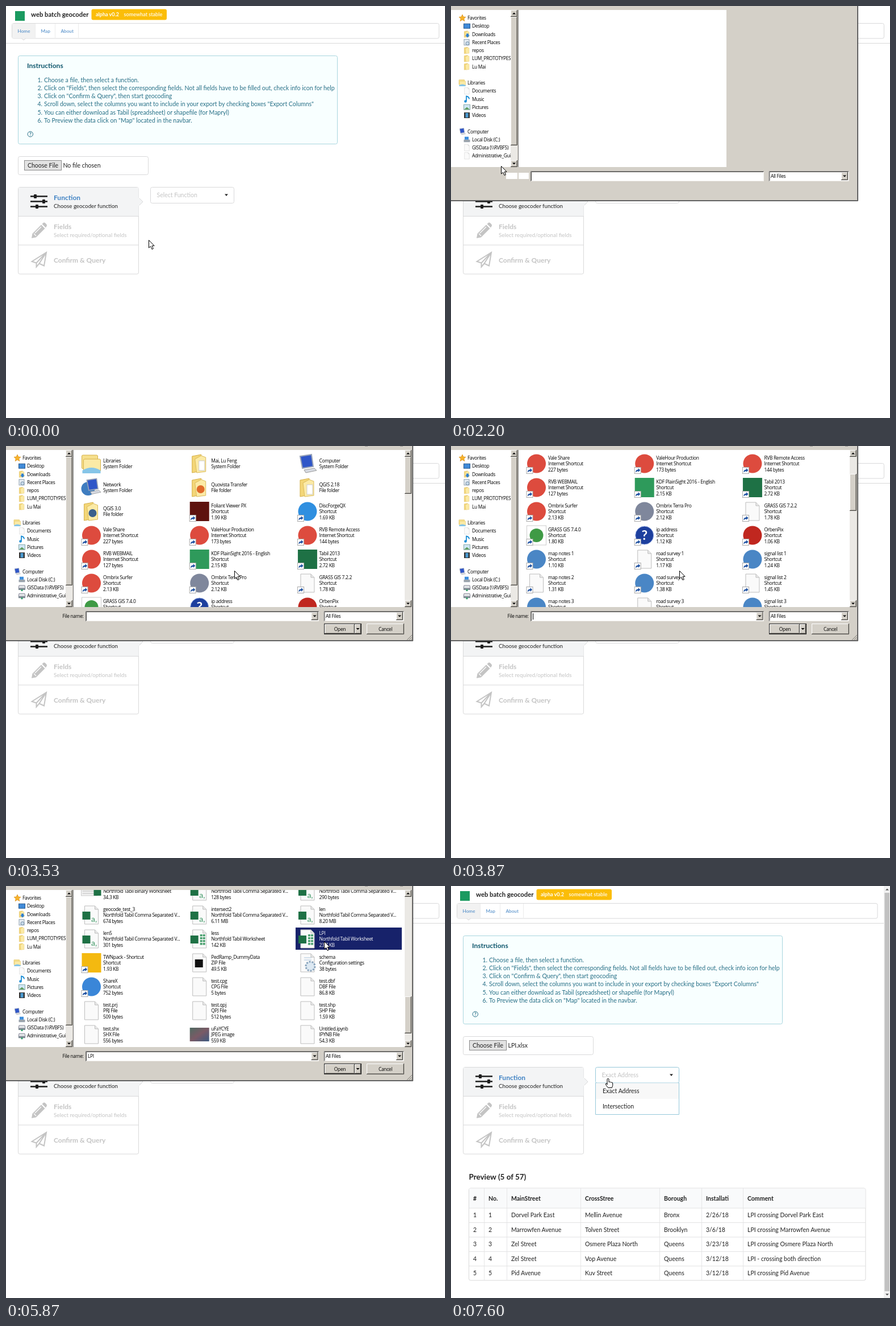
Write an HTML page that moves like this. It is 773 by 724 pixels and loops after 8 s.

```html
<!DOCTYPE html>
<html lang="en">
<head>
<meta charset="utf-8">
<title>Batch geocoder</title>
<style>
html, body { margin: 0; width: 100%; height: 100%; overflow: hidden; background: #fff; }
svg { display: block; width: 100vw; height: 100vh; }
text { font: 10.5px Lato, sans-serif; fill: #212121; white-space: pre; }
.b { font-weight: 700; }
.h2 { font-size: 13.44px; font-weight: 700; }
.h4 { font-size: 11.25px; font-weight: 700; }
.t { font-size: 12px; font-weight: 700; }
.d { font-size: 9.75px; }
.m { font-size: 8.25px; }
.l { font-size: 9px; font-weight: 700; fill: #fff; }
.w { font: 8.4px "Open Sans", "Noto Sans", sans-serif; letter-spacing: -.3px; fill: #000; }
.comma { font-size: 14px; fill: #3d9865; }
.ask { font-size: 23px; font-weight: 700; fill: #fff; }
.link { fill: #4183c4; }
.info { fill: #276f86; }
.dark { fill: #0e566c; }
.off { fill: #c4c4c4; }
.mid { text-anchor: middle; }
.end { text-anchor: end; }
.picked .w { fill: #fff; }
</style>
</head>
<body>
<svg id="stage" viewBox="0 0 773 724"></svg>
<script>
const LOOP = 8000, ROW = 42;
const LINE = '#d9d9da', FACE = '#d4d0c8';

const text = (x, y, s, c = '') => `<text x="${x}" y="${y}" class="${c}">${s}</text>`;
const rect = (x, y, w, h, fill, stroke = 'none', r = 0) =>
  `<rect x="${x}" y="${y}" width="${w}" height="${h}" rx="${r}" fill="${fill}" stroke="${stroke}"/>`;
const path = (d, fill, stroke = 'none', sw = 1) =>
  `<path d="${d}" fill="${fill}" stroke="${stroke}" stroke-width="${sw}"/>`;
const circle = (x, y, r, fill, stroke = 'none') =>
  `<circle cx="${x}" cy="${y}" r="${r}" fill="${fill}" stroke="${stroke}"/>`;
const group = (id, s, attr = '') => `<g id="${id}" ${attr}>${s}</g>`;
const at = (x, y, s, k = 1) => `<g transform="translate(${x} ${y}) scale(${k})">${s}</g>`;

// ---------- web page ----------
const steps = [
  'Choose a file, then select a function.',
  'Click on "Fields", then select the corresponding fields. Not all fields have to be filled out, check info icon for help',
  'Click on "Confirm &amp; Query", then start geocoding',
  'Scroll down, select the columns you want to include in your export by checking boxes "Export Columns"',
  'You can either download as Tabil (spreadsheet) or shapefile (for Mapryl)',
  'To Preview the data click on "Map" located in the navbar.'
];

const header =
  rect(16, 9, 17, 17, '#1b9a60') +
  text(44, 19, 'web batch geocoder', 'h4') +
  rect(150.5, 5.5, 132.5, 19, '#fbbd08', 'none', 3) +
  text(158, 18.2, 'alpha v0.2', 'l') +
  `<g opacity=".85">${text(207.5, 18.2, 'somewhat stable', 'l')}</g>` +
  '<rect id="bar" x="10.5" y="30.5" width="752" height="26.5" rx="3" fill="#fff" stroke="#d9d9da"/>' +
  rect(11, 31, 40, 25.5, '#f2f2f2') +
  path('M51.5 31V57M86.5 31V57M127.5 31V57', 'none', '#ececec') +
  path('M27.5 57L31 60L34.5 57', '#f2f2f2', LINE) +
  text(20.5, 46.5, 'Home', 'm link') + text(61.5, 46.5, 'Map', 'm link') + text(96.5, 46.5, 'About', 'm link') +
  path('M0 65.5H773', 'none', '#d8d8d8');

const help =
  rect(21.5, 87.5, 562, 155, '#f8ffff', '#a9d5de', 3) +
  text(37, 109, 'Instructions', 't dark') +
  steps.map((s, i) => text(64, 133.5 + i * 14.25, i + 1 + '.', 'info end') + text(67, 133.5 + i * 14.25, s, 'info')).join('') +
  circle(42.8, 225.2, 4.7, 'none', '#276f86') + text(42.8, 228.4, '?', 'm b info mid');

const sliders = path('M43 334.5H73M43 343.5H73M43 352.5H73', 'none', '#1f1f1f', 2.4) +
  [[49, 331], [64, 340], [52, 349]].map(([x, y]) => rect(x, y, 5, 7, '#1f1f1f', 'none', 1)).join('');
const pencil = path('M45 408L46.5 400L62 384.5L68.5 391L53 406.5ZM63.5 383L66 380.8Q67.5 380 69 381.2L71.6 384Q72.6 385.6 71.5 387L70 389.5Z', '#c4c4c4') +
  path('M49 400L53 404M51 399L62 388', 'none', '#fff', 1.3);
const plane = path('M45.5 449L71 433L67 456.5L58.5 452.5L53.5 458.5V451.5ZM53.5 451.5L71 433L58.5 452.5', 'none', '#c4c4c4', 2);

const wizard =
  rect(21.5, 264.5, 229, 32, '#fff', LINE, 3) +
  '<rect id="choose" x="32.5" y="271.5" width="65" height="17" fill="#e3e3e3" stroke="#8a8a8a"/>' +
  text(38, 284, 'Choose File') + '<text id="chosen" x="100.5" y="284"></text>' +
  path('M233 336L241 344L233 352', '#f3f4f5', LINE) +
  rect(21.5, 318.5, 212, 152.5, '#fff', LINE, 3) +
  rect(22, 319, 211.5, 50, '#f3f4f5') + rect(231, 337, 4, 14, '#f3f4f5') +
  path('M22 369.5H233M22 420H233', 'none', LINE) +
  sliders + pencil + plane +
  text(84, 341, 'Function', 't link') + text(84, 354.5, 'Choose geocoder function', 'd') +
  text(84, 392, 'Fields', 't off') + text(84, 405.5, 'Select required/optional fields', 'd off') +
  text(84, 450.5, 'Confirm &amp; Query', 't off');

const dropdown =
  '<rect id="box" x="254.5" y="318.5" width="147" height="28" rx="3" fill="#fff"/>' +
  '<text id="value" x="265.5" y="336" class="off"></text>' +
  path('M385 330.5H391L388 334Z', '#222') +
  group('menu', path('M254.5 0H401.5V55.5H254.5Z', '#fff', '#96c8da') +
    rect(255, 0.5, 146, 27.5, '#f8f8f8') +
    text(267, 17.5, 'Exact Address') + text(267, 45, 'Intersection'));

const cols = [39, 66, 106, 236, 375, 449, 522];
const table = `#|No.|MainStreet|CrossStree|Borough|Installati|Comment
1|1|Dorvel Park East|Mellin Avenue|Bronx|2/26/18|LPI crossing Dorvel Park East
2|2|Marrowfen Avenue|Tolven Street|Brooklyn|3/6/18|LPI crossing Marrowfen Avenue
3|3|Zel Street|Osmere Plaza North|Queens|3/23/18|LPI crossing Osmere Plaza North
4|4|Zel Street|Vop Avenue|Queens|3/12/18|LPI - crossing both direction
5|5|Pid Avenue|Kuv Street|Queens|3/12/18|LPI crossing Pid Avenue`.split('\n').map(r => r.split('|'));
const preview =
  text(31.5, 516, 'Preview (5 of 57)', 'h2') +
  rect(31.5, 531, 698.5, 162, '#fff', LINE, 3) + rect(32, 531.5, 697.5, 34.5, '#f9fafb') +
  cols.slice(1).map(x => path(`M${x - 7.5} 531V693`, 'none', '#e6e6e7')).join('') +
  table.map((r, i) => {
    const y = i ? 557 + i * 25.45 : 552.7;
    return r.map((s, j) => text(cols[j], y, s, i ? '' : 'b')).join('') +
      (i ? path(`M32 ${540.6 + i * 25.45}H730`, 'none', '#e2e2e3') : '');
  }).join('') +
  rect(762, 0, 11, 724, '#f1f1f1') + rect(763.5, 12, 8.5, 700, '#c1c1c1') +
  path('M765 7.5H771L768 4.5ZM765 716.5H771L768 719.5Z', '#505050');

// ---------- file dialog ----------
const corner = (x, y, w, h, c) => path(`M${x} ${y + h - .5}H${x + w - .5}V${y}`, 'none', c);
const edge = (x, y, w, h, c) => path(`M${x + .5} ${y + h}V${y + .5}H${x + w}`, 'none', c);
const bevel = (x, y, w, h) => rect(x, y, w, h, FACE) + edge(x, y, w, h, '#fff') +
  corner(x + 1, y + 1, w - 2, h - 2, '#a5a29b') + corner(x, y, w, h, '#45433f');
const well = (x, y, w, h) => rect(x, y, w, h, '#fff') + corner(x, y, w, h, '#f2f0ec') +
  edge(x, y, w, h, '#808080') + edge(x + 1, y + 1, w - 2, h - 2, '#55534f');
const down = (x, y) => path(`M${x - 3} ${y - 1.5}H${x + 3}L${x} ${y + 1.5}Z`, '#000');
const up = (x, y) => path(`M${x - 3} ${y + 1.5}H${x + 3}L${x} ${y - 1.5}Z`, '#000');
const scroller = (x, id, h) => rect(x, 7, 12, 276, '#ebe9e5') +
  bevel(x, 7, 12, 12) + up(x + 6, 13) + bevel(x, 271, 12, 12) + down(x + 6, 277) +
  group(id, bevel(x, 19, 12, h));

const page = path('M-12 -16H6L12 -10V16H-12Z', '#fafafa', '#bdbdbd') + path('M6 -16V-10H12', '#e8e8e8', '#bdbdbd');
const folder = path('M-13 -13L3 -16V13L-13 16Z', '#f3d678', '#d5b04a') + path('M3 -14L11 -11V14L-5 16L-8 -8Z', '#fbeaa6', '#dcbc5c');
const screen = path('M-13 -13L7 -16L10 5L-9 8Z', '#2f56c8', '#9aa4b8', 2) + path('M-6 11L12 8L16 12L-3 16Z', '#d7dbe3', '#999');
const box = (x, y, s, c) => rect(x, y, s, s, c);
const grid = [0, 1, 2, 3].map(i => rect(1, -8 + i * 5, 4, 3.5, '#4aa06f') + rect(6, -8 + i * 5, 4, 3.5, '#4aa06f')).join('');
const icons = {
  page: () => page,
  folder: () => folder,
  inside: c => folder + circle(2, 3, 7, c),
  sheets: () => folder + rect(-1, -5, 10, 17, '#fff', '#ccc'),
  lib: () => rect(-17, -15, 28, 24, '#f6df8c', '#d5b04a', 2) + rect(-14, -8, 30, 22, '#fbeaa6', '#d5b04a', 2) + path('M-16 12Q0 2 16 12V17H-16Z', '#86c5e8'),
  pc: () => screen,
  net: () => circle(-6, 2, 12, '#3f7dc0') + at(3, -2, screen, .85),
  disc: c => circle(0, 0, 16.5, c),
  square: c => box(-17, -17, 34, c),
  badge: c => rect(-17, -17, 34, 34, '#fff', '#ccc') + circle(0, 0, 12, c),
  csv: c => page + text(-.5, 11.5, 'a,', 'comma') + box(-16, -6, 14, c),
  sheet: c => page + grid + box(-16, -6, 14, c),
  doc: c => page + path('M0 -8H9M0 -4H9M0 0H9M0 4H9M0 8H9', 'none', '#8aa4d0') + box(-17, -5, 15, c),
  wide: c => rect(-18, -9, 28, 17, '#f1f1f1', '#ccc') + path('M-16 -5H8M-16 0H6M-16 4H8', 'none', '#bbb') + box(4, -5, 13, c),
  books: () => rect(-15, -11, 30, 25, '#c9b27a', '#8c7a4c', 2) + ['#7a2430', '#2f4f3c', '#7a2430'].map((c, i) => rect(-9 + i * 7, -7, 5, 18, c)).join(''),
  mail: () => rect(-13, -16, 28, 32, '#fff', '#ccc') + path('M-5 -5L0 0', 'none', '#d33', 3) + path('M7 -5L2 0', 'none', '#28a', 3) + path('M-5 7L0 2', 'none', '#2a5', 3) + path('M7 7L2 2', 'none', '#e90', 3),
  ask: () => circle(0, 0, 16, '#1d3f9e', '#9db2e6') + text(0, 8, '?', 'ask mid'),
  zip: () => page + box(-8, -6, 14, '#111'),
  gear: () => page + path('M-6 -9H7M-6 -5H7', 'none', '#aac4dc') + '<circle cx="5" cy="6" r="8" fill="#dce8f2" stroke="#8aa5bd" stroke-width="3" stroke-dasharray="3 2"/>',
  photo: () => rect(-17, -12, 34, 24, 'url(#tones)')
};
const link = rect(-17.5, 6.5, 11, 11, '#fff', '#aaa') + path('M-15.5 15.5Q-16 10.5 -11 10.5V8L-7.5 11.5L-11 15V13Q-14 13 -15.5 15.5Z', '#1c4fa0');

const kinds = {
  S: 'System Folder', F: 'File folder', L: 'Shortcut', I: 'Internet Shortcut',
  C: 'Northfold Tabil Comma Separated V...', W: 'Northfold Tabil Worksheet'
};
const GREEN = '#1e7145', WEB = '#dd4b3e';
const first = `Libraries|S||lib
Mai, Lu Feng|S||sheets
Computer|S||pc
Network|S||net
Quovista Transfer|F||inside #e06a2a
QGIS 2.18|F||sheets
QGIS 3.0|F||inside #3a5f8c
Foliant Viewer PX|L|1.99 KB|square #5e120e
DiscForgeQX|L|1.69 KB|disc #2f8fe0
Vale Share|I|227 bytes|disc ${WEB}
ValeHour Production|I|173 bytes|disc ${WEB}
RVB Remote Access|I|144 bytes|disc ${WEB}
RVB WEBMAIL|I|127 bytes|disc ${WEB}
KDF PlainSight 2016 - English|L|2.15 KB|square #2e9a5b
Tabil 2013|L|2.72 KB|square ${GREEN}
Ombrix Surfer|L|2.13 KB|disc ${WEB}
Ombrix Terra Pro|L|2.12 KB|disc #7f879c
GRASS GIS 7.2.2|L|1.78 KB|page
GRASS GIS 7.4.0|L|1.80 KB|badge #3f9a45
ip address|L|1.12 KB|ask
OrbenPix|L|1.06 KB|disc #c0271f`;
const last = `base_points|C|1.06 KB|csv ${GREEN}
Atom|L|2.07 KB|disc #3fb27f
City Forms|I|129 bytes|disc ${WEB}
Conflict Locations - Upload to~Pedestrian Ramp Database_1|C||csv ${GREEN}
Conflict Locations - Upload to~Pedestrian Ramp Database_1-25-18|W||sheet ${GREEN}
Conflict Locations - Upload to~Pedestrian Ramp Database_2|C||csv ${GREEN}
Connect_to_PLVRTD_GIS_data_MapCa~talog_10_2_1 (1)|Northfold Lexil 97 - 2003 Document||doc #2b579a
RVB Employee Manuals|I|242 bytes|books
EmailSearch|I|201 bytes|mail
formats_20140628|Northfold Tabil Binary Worksheet|34.3 KB|wide ${GREEN}
geocode_test|C|128 bytes|csv ${GREEN}
geocode_test_2|C|290 bytes|csv ${GREEN}
geocode_test_3|C|674 bytes|csv ${GREEN}
intersect2|C|6.11 MB|csv ${GREEN}
len|C|8.20 MB|csv ${GREEN}
len5|C|301 bytes|csv ${GREEN}
less|W|142 KB|sheet ${GREEN}
LPI|W|23.7 KB|sheet ${GREEN}
TWNpack - Shortcut|L|1.93 KB|square #f4b910
PedRamp_DummyData|ZIP File|49.5 KB|zip
schema|Configuration settings|38 bytes|gear
ShareX|L|752 bytes|disc #3a86d8
test.cpg|CPG File|5 bytes|page
test.dbf|DBF File|86.8 KB|page
test.prj|PRJ File|509 bytes|page
test.qpj|QPJ File|512 bytes|page
test.shp|SHP File|1.59 KB|page
test.shx|SHX File|556 bytes|page
uFaYCYE|JPEG image|559 KB|photo
Untitled.ipynb|IPYNB File|54.3 KB|page`;
const filler = Array.from({ length: 21 }, (_, i) => {
  const n = ['map notes', 'road survey', 'signal list'][i % 3] + ' ' + (1 + (i / 3 | 0));
  return i < 12 ? `${n}|L|1.${10 + i * 7} KB|${i % 2 ? 'page' : 'disc #4a86c5'}` : `${n}|C|${120 + i * 9} bytes|csv ${GREEN}`;
});

const files = [...first.split('\n'), ...filler, ...last.split('\n')].map((s, i) => {
  const [name, kind, size, icon] = s.split('|'), [shape, color] = icon.split(' ');
  const lines = [...name.split('~'), kinds[kind] || kind, size].filter(Boolean);
  const body = icons[shape](color) + (kind === 'L' || kind === 'I' ? link : '') +
    lines.map((l, j) => text(20.5, (j - (lines.length - 1) / 2) * 10.5 + 3.2, l, 'w')).join('');
  const cell = s => at(150.5 + (i % 3) * 190.2, 31 + (i / 3 | 0) * ROW, s);
  return name === 'LPI' ? group('pick', cell(group('mark', rect(-21, -20, 187, 39, '#17226a')) + body)) : cell(body);
}).join('');

const mini = {
  star: path('M0 -6L1.8 -2L6 -1.6L2.8 1.3L3.8 5.6L0 3.3L-3.8 5.6L-2.8 1.3L-6 -1.6L-1.8 -2Z', '#f7b32b', '#d98b12', .7),
  folder: at(0, 0, folder, .36), desk: rect(-5.5, -4, 11, 8, '#3f8ad8', '#27598f'),
  down: at(0, 0, folder, .36) + path('M-1 -1H3V2H5L1 6L-3 2H-1Z', '#2f7fd0'),
  recent: rect(-5, -5, 9, 10, '#e5ecf2', '#8fa0b0') + circle(1, 2, 3, '#c5d8e8', '#7890a5'),
  lib: at(0, 0, icons.lib(), .36), page: at(0, 0, page, .36),
  music: path('M-1 4V-5Q4 -4 4 0', 'none', '#1f8fd6', 1.8) + circle(-2.5, 4, 2.3, '#1f8fd6'),
  pic: rect(-5.5, -4.5, 11, 9, '#cfe6f5', '#8aa') + path('M-5 4L0 0L5 4Z', '#5a9a5a'),
  film: rect(-5, -5, 10, 10, '#333') + rect(-2.5, -4, 5, 8, '#4a9ad0'),
  pc: at(0, 0, screen, .36), disk: path('M-5.5 0H5.5V4.5H-5.5Z', '#9aa3ac') + rect(-4, -5, 7, 5, '#3c8edc'),
  drive: path('M-5 -4H5L6 1H-6Z', '#e3e6e8', '#889') + rect(-6, 1, 12, 3, '#7d8a92') + rect(-1.5, 3, 3, 3, '#35a06a')
};
const places = ['Favorites|star', 'Desktop|desk', 'Downloads|down', 'Recent Places|recent', 'repos|folder', 'LUM_PROTOTYPES|folder', 'Lu Mai|folder', '',
  'Libraries|lib', 'Documents|page', 'Music|music', 'Pictures|pic', 'Videos|film', '',
  'Computer|pc', 'Local Disk (C:)|disk', 'GISData (\\\\RVBFS)', 'Administrative_Guides'];
const sidebar = places.map((p, i) => {
  if (!p) return '';
  const [name, icon] = p.split('|'), y = 21 + i * 14.25, x = i % 14 && i !== 8 ? 8 : 0;
  const art = icon ? mini[icon] : `<g class="early">${mini.page}</g><g class="late">${mini.drive}</g>`;
  return at(20 + x, y, art) + text(29 + x, y + 3.2, name, 'w');
}).join('');

const dialog =
  rect(0, 0, 717, 343, FACE) + corner(-1, -1, 717, 343, '#808080') + corner(0, 0, 717, 343, '#404040') +
  rect(0, 7, 105, 276, '#fff') +
  '<rect id="list" x="119" y="7" height="276" fill="#fff"/>' +
  group('side', `<g clip-path="url(#left)">${sidebar}</g>` + scroller(105, 'sideThumb', 226) + path('M118.5 7V283', 'none', '#777')) +
  well(140, 290, 411, 18) + well(559.5, 290, 141, 18) + text(563, 302.2, 'All Files', 'w') +
  bevel(687, 292, 12, 14) + down(693, 299) +
  group('early', rect(97, 293, 20, 11, '#fff') + rect(119, 293, 18, 11, '#fff')) +
  group('chrome',
    text(136.5, 302.2, 'File name:', 'w end') + bevel(537.5, 292, 12, 14) + down(543.5, 299) +
    rect(560.5, 312.5, 65, 18, FACE, '#222') + bevel(561, 313, 53, 17) + bevel(614, 313, 11, 17) + down(619.5, 321.5) +
    bevel(635, 312, 66, 19) + text(588, 324.6, 'Open', 'w mid') + text(668, 324.6, 'Cancel', 'w mid') +
    path('M706 341L715 332M709.5 341L715 335.5M713 341L715 339', 'none', '#7d7a74') +
    path('M632 0H637M694 0H699', 'none', '#666')) +
  group('rows', `<g clip-path="url(#right)">${group('files', files)}</g>` + scroller(702, 'thumb', 65)) +
  group('name', text(144, 302.2, 'LPI', 'w')) +
  group('caret', path('M144.5 294V305', 'none', '#000'));

const arrow = path('M0 0V13.5L3.2 10.7L5.5 16L7.8 15L5.6 9.8H9.6Z', '#fff', '#000');
const hand = path('M-.5 11V2Q-.5 .3 1 .3T2.5 2V6.5Q3.5 5.6 5 6.8Q6.3 6 7.3 7.4Q9.2 7 9.2 9V12.5L7.8 16.5H1L-2.8 11.5Q-4 9.5 -2.5 9T-.5 11Z', '#fff', '#000');

const $ = id => document.getElementById(id);
$('stage').innerHTML =
  `<defs><clipPath id="left">${rect(0, 7, 105, 276)}</clipPath><clipPath id="right">${rect(119, 7, 583, 276)}</clipPath>
  <linearGradient id="tones" x2="1" y2="1"><stop stop-color="#4f6b62"/><stop offset=".5" stop-color="#7a5a66"/><stop offset="1" stop-color="#3d5a80"/></linearGradient></defs>` +
  header + help + wizard + group('preview', preview) + dropdown +
  group('tip', rect(212, 294, 54, 11, '#999') + rect(210, 291.5, 53.5, 11.5, '#ffffe1', '#000') + text(211.5, 300.6, 'No file chosen', 'w')) +
  group('dialog', dialog) + group('arrow', arrow) + group('hand', hand);

// ---------- motion ----------
const pointer = [[0, 251, 411], [270, 225, 312], [400, 225, 312], [530, 210, 275], [1000, 210, 275], [1200, 88, 281],
  [2600, 88, 281], [2870, 401, 224], [3400, 401, 224], [3530, 402, 219], [4270, 402, 219], [4670, 473, 197],
  [4930, 473, 197], [5400, 559, 106], [5530, 559, 106], [5730, 560, 97], [5870, 560, 97], [6200, 215, 259],
  [6330, 215, 259], [6600, 200, 334], [6930, 275, 338]];
const scroll = [[3670, 0], [3870, 126], [4070, 126], [4730, 610], [4870, 736]];

function sample(keys, t) {
  const i = keys.findIndex(k => k[0] > t);
  if (i < 0) return keys[keys.length - 1].slice(1);
  if (!i) return keys[0].slice(1);
  const a = keys[i - 1], b = keys[i], p = (t - a[0]) / (b[0] - a[0]);
  return a.slice(1).map((v, j) => v + (b[j + 1] - v) * p);
}
const show = (el, on) => el.setAttribute('display', on ? 'inline' : 'none');
const move = (id, x, y, k = '') => $(id).setAttribute('transform', `translate(${x} ${y}) ${k}`);

function draw(ms) {
  // the screen refreshes 15 times a second
  const t = Math.round(Math.floor((ms + 4) / (200 / 3)) * 20 / 3) * 10;
  const during = (a, b) => t >= a && t < b;
  const [x, y] = sample(pointer, t), [top] = sample(scroll, t);
  const done = t >= 5930, open = t >= 7400, hot = x > 254 && t > 6600;

  show($('dialog'), during(2070, 5930));
  show($('side'), t >= 2200);
  show($('early'), t < 2470);
  show($('chrome'), t >= 2470);
  show($('rows'), t >= 2530);
  $('list').setAttribute('width', t < 2470 ? 366 : 583);
  document.querySelectorAll('.early').forEach(e => show(e, t < 2670));
  document.querySelectorAll('.late').forEach(e => show(e, t >= 2670));
  show($('caret'), during(2800, 5600) && Math.floor((t - 2800) / 530) % 2 === 0);
  move('files', 0, -Math.round(top));
  move('thumb', 0, Math.round(top * .238));

  const picked = t >= 5600;
  show($('name'), picked);
  show($('mark'), picked);
  $('pick').setAttribute('class', picked ? 'picked' : '');

  show($('tip'), during(1000, 2070));
  $('choose').setAttribute('stroke', during(1130, 2070) ? '#555' : '#8a8a8a');
  $('chosen').textContent = done ? 'LPI.xlsx' : 'No file chosen';
  show($('preview'), t >= 6070);
  $('bar').setAttribute('width', t >= 6070 ? 740.5 : 752);

  $('box').setAttribute('stroke', open ? '#96c8da' : hot ? '#bdbebf' : LINE);
  $('value').textContent = open ? 'Exact Address' : 'Select Function';
  show($('menu'), open);
  move('menu', 0, 346, `scale(1 ${Math.min(1, (t - 7330) / 270)})`);

  show($('arrow'), !hot);
  show($('hand'), hot);
  move('arrow', x + .5, y + .5);
  move('hand', x + .5, y);
}

const start = performance.now();
(function tick() {
  draw((performance.now() - start) % LOOP);
  requestAnimationFrame(tick);
})();
</script>
</body>
</html>
```
